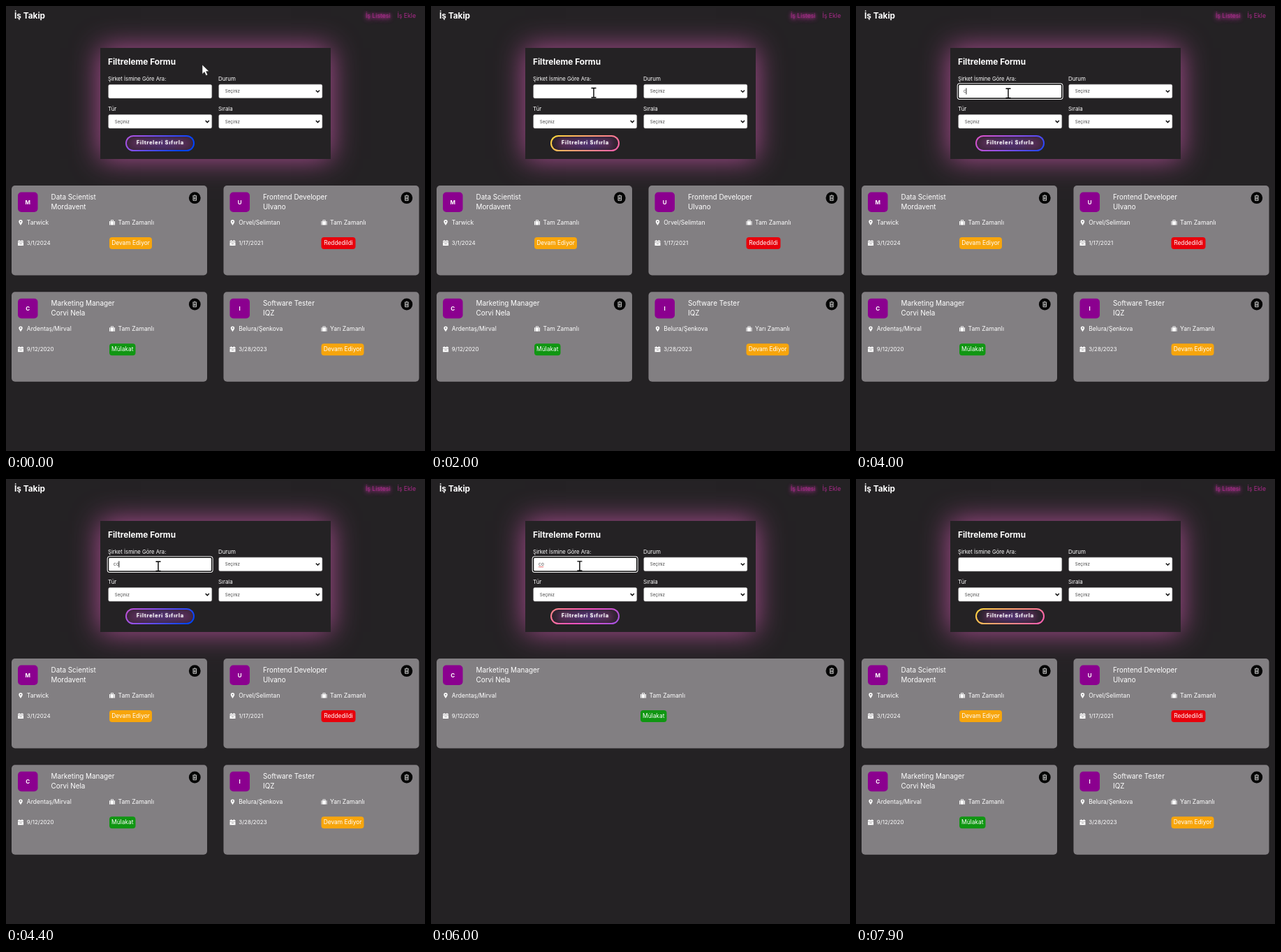
An HTML page that plays this animation: 600x637 px, repeating every 8000 ms.

```html
<!DOCTYPE html>
<html lang="tr">
<head>
<meta charset="utf-8">
<title>İş Takip</title>
<style>
  html, body { margin: 0; width: 100%; height: 100%; overflow: hidden; background: #242224; }
  svg { position: absolute; left: 0; top: 0; }
  text { font-family: Inter, "Open Sans", sans-serif; fill: #fff; white-space: pre; }
  .form { position: absolute; left: 135px; top: 60px; width: 330px; height: 159px;
    background: #242224; box-shadow: 0 0 38px #b04f96; }
  .reset { position: absolute; left: 171px; top: 185px; width: 99px; height: 23px; border-radius: 12px;
    background: linear-gradient(137.48deg, #ffdb3b 10%, #fe53bb 45%, #8f51ea 67%, #04f 87%) 0 50% / 300% 300%; }
  .inner { position: absolute; inset: 1.7px; border-radius: 10px; background: #2a222c; overflow: hidden; }
  .glow { position: absolute; inset: 0; filter: blur(6px);
    background: linear-gradient(90deg, #84367088, #673a9caa 55%, #84367088); }
  .reset b { position: absolute; inset: 0; font: 700 7px/22px Inter, "Open Sans", sans-serif;
    letter-spacing: 1px; text-indent: 1px; text-align: center; color: #fff; text-shadow: 0 0 2px #fff9; }
</style>
</head>
<body>
<div class="form"></div>
<svg id="page" width="600" height="637"></svg>
<div class="reset"><div class="inner"><div class="glow"></div></div><b>Filtreleri Sıfırla</b></div>
<svg id="pointer" width="600" height="637">
  <path id="arrow" d="M0 0V13.5L3.2 10.6 5.4 15.6 7.8 14.5 5.6 9.7 9.7 9.4Z" fill="#fff" stroke="#222" stroke-width=".6"/>
  <path id="beam" d="M-3.5-6.7H3.5M0-6.7V6.7M-3.5 6.7H3.5" fill="none" stroke="#000" stroke-width="1.4"/>
</svg>
<script>
const $ = s => document.querySelector(s);
const ORANGE = '#f7a50c', RED = '#e8000b', GREEN = '#109612';
const LOOP = 8000, FOCUS = 3300, TYPE_C = 3900, TYPE_O = 4300, FILTER = 4500, SPELL = 6000, RELOAD = 7700;

const text = (x, y, size, str, attrs = '') => `<text x="${x}" y="${y}" font-size="${size}" ${attrs}>${str}</text>`;
const rect = (x, y, w, h, r, fill, attrs = '') =>
  `<rect x="${x}" y="${y}" width="${w}" height="${h}" rx="${r}" fill="${fill}" ${attrs}/>`;
const icon = (x, y, d) => `<path transform="translate(${x} ${y})" d="${d}" fill="#fff" fill-rule="evenodd"/>`;

const PIN = 'M0 4C-1.6 1.6-2.7.3-2.7-1.2A2.7 2.7 0 0 1 2.7-1.2C2.7.3 1.6 1.6 0 4ZM0-2.2A1 1 0 0 0 0-.2 1 1 0 0 0 0-2.2Z';
const BAG = 'M-4-2H-3V3.5H-4ZM-2.4-2H-2V-3.8H2V-2H2.4V3.5H-2.4ZM-1.1-2H1.1V-3H-1.1ZM3-2H4V3.5H3Z';
const DAY = 'M-4-3H-2.5V-4H-1.5V-3H1.5V-4H2.5V-3H4V-1.4H-4ZM-4-.8H4V4H-4ZM-1.7 1V1.8H1.7V1Z';

const jobs = [
  ['Data Scientist', 'Mordavent', 'Tarwick', 'Tam Zamanlı', '3/1/2024', 'Devam Ediyor', ORANGE, 61],
  ['Frontend Developer', 'Ulvano', 'Orvel/Selimtan', 'Tam Zamanlı', '1/17/2021', 'Reddedildi', RED, 49],
  ['Marketing Manager', 'Corvi Nela', 'Ardentaş/Mirval', 'Tam Zamanlı', '9/12/2020', 'Mülakat', GREEN, 37.5],
  ['Software Tester', 'IQZ', 'Belura/Şenkova', 'Yarı Zamanlı', '3/28/2023', 'Devam Ediyor', ORANGE, 61]
];

function card([title, firm, place, kind, date, state, color, badge], x, y, w) {
  const mid = w > 300 ? 292 : 140;
  return `<g transform="translate(${x} ${y})">` +
    rect(0, 0, w, 128.5, 5, '#827f82') +
    rect(9, 9.5, 28.5, 28.5, 5, '#8b008f') +
    text(23.2, 26.5, 8, firm[0], 'font-weight="700" text-anchor="middle"') +
    text(56.5, 19.7, 9.9, title) + text(56.5, 34, 9.9, firm) +
    `<circle cx="${w - 17.7}" cy="17.7" r="8.4" fill="#050505"/>` +
    `<path transform="translate(${w - 17.7} 17.7)" d="M-3-2.9H3M-1-3.8H1M-2.3-2.5V3.7H2.3V-2.5M-.8-1.2V2.3M.8-1.2V2.3" fill="none" stroke="#ddd" stroke-width=".9"/>` +
    icon(13, 53, PIN) + text(21.8, 56, 8.5, place) +
    icon(mid + 4, 53, BAG) + text(mid + 12.5, 56, 8.6, kind) +
    icon(13, 82, DAY) + text(21.8, 85, 8, date) +
    rect(mid, 74, badge, 17, 4, color) +
    text(mid + badge / 2, 85.2, 8.4, state, 'text-anchor="middle"') + '</g>';
}

const field = (x, y) => rect(x, y, 148, 19.6, 2, '#fff', 'stroke="#bbb" stroke-width=".5"');
const select = (x, y) => field(x, y) + text(x + 9, y + 12, 6.2, 'Seçiniz', 'style="fill:#444"') +
  `<path d="M${x + 139} ${y + 8.5}l2.6 2.6 2.6-2.6" fill="none" stroke="#111" stroke-width="1.5"/>`;

$('#page').innerHTML =
  text(12, 18.3, 11.8, 'İş Takip', 'font-weight="700"') +
  text(515, 17.3, 8.7, 'İş Listesi', 'style="fill:#ab2a8b;text-shadow:0 0 4px #d040b0,0 2px 7px #d040b0"') +
  text(560.5, 17.3, 8.7, 'İş Ekle', 'style="fill:#ab2a8b"') +
  text(146, 84.3, 11.8, 'Filtreleme Formu', 'font-weight="700"') +
  text(146, 106.5, 7.7, 'Şirket İsmine Göre Ara:') + text(304, 106.5, 7.9, 'Durum') +
  text(146, 149.5, 7.9, 'Tür') + text(304, 149.5, 7.9, 'Sırala') +
  field(146.7, 112.5) + select(304.8, 112.2) + select(146.7, 155.5) + select(304.8, 155.5) +
  `<g id="ring">${rect(146, 111.8, 149.3, 21, 2.5, '#fff', 'stroke="#fff" stroke-width="2.6"')}
   ${rect(146.5, 112.3, 148.3, 20, 2, '#fff', 'stroke="#080808" stroke-width="1.5"')}</g>` +
  text(153.8, 124.3, 7, '', 'id="typed" style="fill:#555"') +
  '<path id="caret" d="M0 117.5v9" stroke="#111" stroke-width=".9"/>' +
  '<path id="spell" d="M154 126.3l1-1 1 1 1-1 1 1 1-1 1 1 1-1" fill="none" stroke="#d22" stroke-width=".8"/>' +
  `<g id="all">${jobs.map((j, i) => card(j, 8 + i % 2 * 303.5, 257 + (i >> 1) * 152.3, 280)).join('')}</g>` +
  `<g id="found">${card(jobs[2], 8, 257, 583.5)}</g>`;

const show = (id, on) => $(id).style.display = on ? '' : 'none';

// CSS "ease": cubic-bezier(.25, .1, .25, 1)
function ease(x) {
  let lo = 0, hi = 1, s;
  for (let i = 0; i < 16; i++) {
    s = (lo + hi) / 2;
    const bx = .75 * s * (1 - s) + s ** 3;
    bx < x ? lo = s : hi = s;
  }
  return .3 * s * (1 - s) ** 2 + 3 * s * s * (1 - s) + s ** 3;
}

// time, x, y
const path = [[0, 281, 84], [1000, 252, 122], [1300, 252, 122], [2600, 218, 126], [3400, 218, 125],
  [4400, 218, 125], [5000, 215, 125], [5600, 215, 125], [6500, 210, 124], [6920, 210, 124], [7220, 94, 4]];

function pointerAt(t) {
  const i = path.findIndex(p => p[0] > t);
  if (i < 0) return path[path.length - 1].slice(1);
  const [t0, x0, y0] = path[i - 1], [t1, x1, y1] = path[i];
  const u = (t - t0) / (t1 - t0), k = u * u * (3 - 2 * u);
  return [x0 + (x1 - x0) * k, y0 + (y1 - y0) * k];
}

function draw(t) {
  const live = t < RELOAD;
  const typed = !live || t < TYPE_C ? '' : t < TYPE_O ? 'c' : 'co';
  const focused = live && t >= FOCUS;
  const since = t - (t < TYPE_C ? FOCUS : t < TYPE_O ? TYPE_C : TYPE_O);
  const filtered = live && t >= FILTER;
  show('#ring', focused);
  $('#typed').textContent = typed;
  show('#caret', focused && since % 1060 < 530);
  $('#caret').setAttribute('transform', `translate(${154 + typed.length * 3.9} 0)`);
  show('#spell', live && t >= SPELL);
  show('#all', !filtered);
  show('#found', filtered);

  const age = live ? t - 2700 + 20000 : t - RELOAD;
  const sweep = age % 5000 / 2500;
  const pos = sweep < 1 ? ease(sweep) : 1 - ease(sweep - 1);
  $('.reset').style.backgroundPosition = `${pos * 100}% 50%`;
  const beat = age % 4000 / 4000;
  const swell = beat < .7 ? ease(beat / .7) : 1 - ease((beat - .7) / .3);
  $('.glow').style.transform = `scale(${.75 + .25 * swell})`;

  const [x, y] = pointerAt(t);
  const inField = y > 112 && x > 147 && x < 295;
  show('#pointer', t < 7300);
  show('#beam', inField);
  show('#arrow', !inField);
  for (const id of ['#beam', '#arrow']) $(id).setAttribute('transform', `translate(${x} ${y})`);
}

const start = performance.now();
function tick() {
  draw((performance.now() - start) % LOOP);
  requestAnimationFrame(tick);
}
tick();
</script>
</body>
</html>
```
